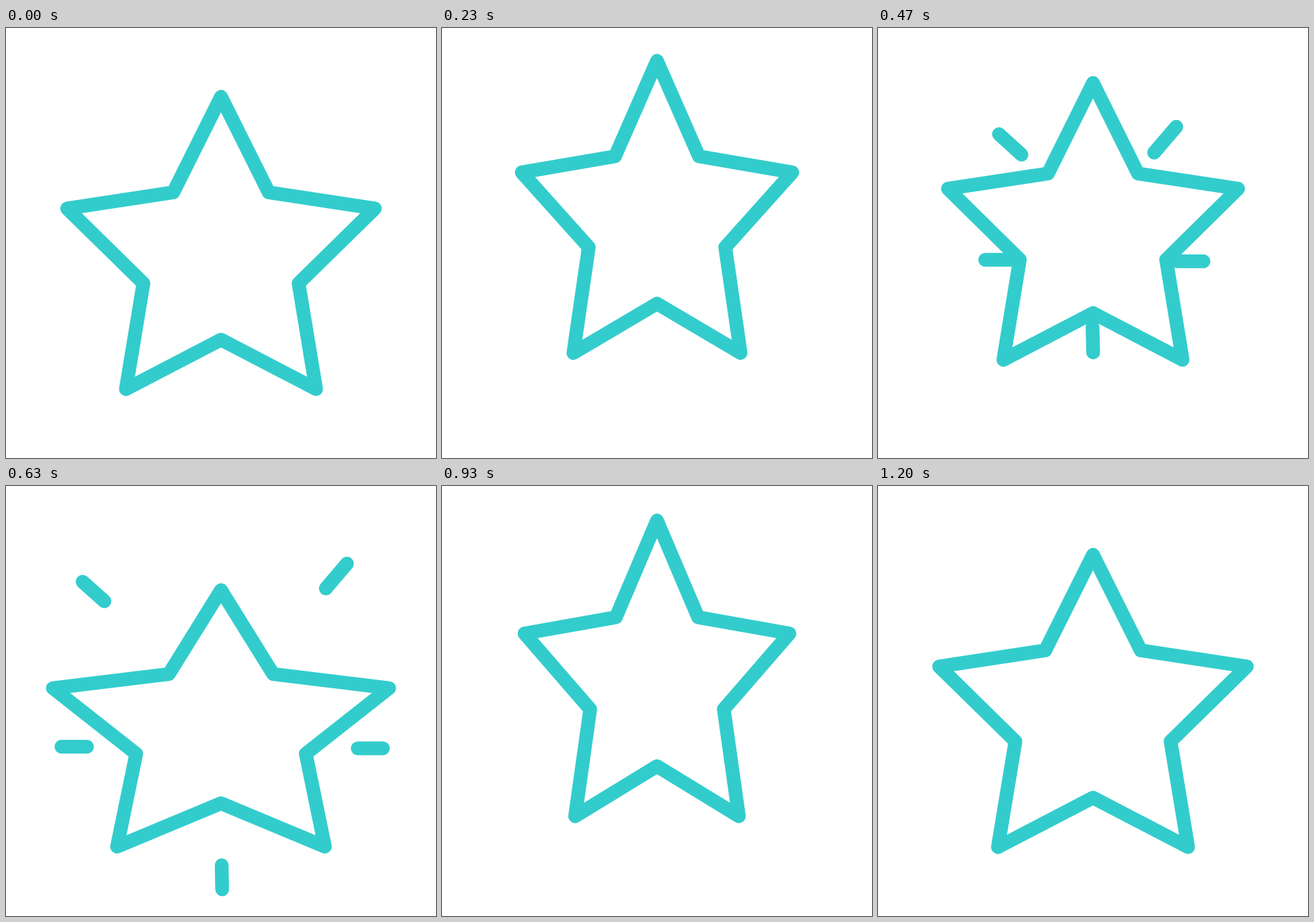
Recreate the animation shown at these times as an HTML page with a canvas. Size 640 by 640 pixels, loop 1.57 s.

```html
<!DOCTYPE html>
<html lang="en">
<head>
<meta charset="utf-8">
<title>Bouncing star</title>
<style>
  html, body { margin: 0; width: 100%; height: 100%; overflow: hidden; background: #fff; }
  canvas { display: block; }
</style>
</head>
<body>
<canvas id="stage" width="640" height="640"></canvas>
<script>
const ctx = document.getElementById('stage').getContext('2d');
const LOOP = 1570, STEP = 100 / 3, LAST_STEP = 36;
const COLOR = '#33cccc';

// Right half of the star: x as offset from the axis, y from 0 (top) to 1 (bottom).
const HALF = [[0, 0], [71, 0.327], [229, 0.382], [115.5, 0.638], [141.5, 1], [0, 0.831]];
const OUTLINE = HALF.concat(HALF.slice(1, -1).reverse().map(([x, y]) => [-x, y]));

// soft: 0 is a linear leg, 1 a full sine ease.
const POSES = [
  { at: 0,  width: 1,     top: 102.4, bottom: 537.5, soft: 0 },
  { at: 10, width: 0.830, top: 26.8,  bottom: 461.7, soft: 0.1 },
  { at: 19, width: 1.093, top: 155,   bottom: 536.7, soft: 0.5 },
  { at: 28, width: 0.861, top: 51.4,  bottom: 491.5, soft: 0.25 },
  { at: 36, width: 1,     top: 102.4, bottom: 537.5, soft: 0.1 }
];

// Each ray as [head x, head y, tail x, tail y] at launch and at rest.
const RAYS = [
  { from: [396.3, 170.7, 362.1, 210.3], to: [507.5, 115.5, 476, 152.5] },
  { from: [229.6, 169.7, 263.9, 201.3], to: [114, 142.5, 146.5, 171.5] },
  { from: [427, 314.8, 387.7, 314.8],   to: [561, 390.5, 523.5, 390.5] },
  { from: [217.4, 312.7, 256.3, 312.7], to: [82.5, 388, 120.5, 388] },
  { from: [319.1, 394.8, 318, 355.1],   to: [321.7, 600.3, 321, 564.5] }
];
const LAUNCH = 10, REST = 19, GONE = 23;

const mix = (a, b, p) => a + (b - a) * p;
const clamp = p => Math.min(1, Math.max(0, p));
const ease = (p, soft) => mix(p, (1 - Math.cos(Math.PI * p)) / 2, soft);

function poseAt(step) {
  const i = Math.max(1, POSES.findIndex(pose => pose.at >= step));
  const a = POSES[i - 1], b = POSES[i];
  const p = ease((step - a.at) / (b.at - a.at), b.soft);
  return {
    width: mix(a.width, b.width, p),
    top: mix(a.top, b.top, p),
    bottom: mix(a.bottom, b.bottom, p)
  };
}

function drawRays(step) {
  if (step <= LAUNCH || step >= GONE) return;
  const p = ease(clamp((step - LAUNCH) / (REST - LAUNCH)), 0.5);
  const shrink = clamp((step - REST) / (GONE - REST));
  for (const { from, to } of RAYS) {
    const [hx, hy, tx, ty] = from.map((v, i) => mix(v, to[i], p));
    ctx.beginPath();
    ctx.moveTo(hx, hy);
    ctx.lineTo(mix(tx, hx, shrink), mix(ty, hy, shrink));
    ctx.stroke();
  }
}

function drawStar(step) {
  const { width, top, bottom } = poseAt(step);
  ctx.beginPath();
  for (const [x, y] of OUTLINE) ctx.lineTo(320 + x * width, mix(top, bottom, y));
  ctx.closePath();
  ctx.fill();
  ctx.stroke();
}

function draw(time) {
  const ms = Math.floor((time % LOOP) / 10) * 10;
  const step = Math.min(LAST_STEP, Math.floor((ms + 5) / STEP));
  ctx.fillStyle = '#fff';
  ctx.fillRect(0, 0, 640, 640);
  ctx.strokeStyle = COLOR;
  ctx.lineWidth = 20.5;
  ctx.lineCap = ctx.lineJoin = 'round';
  drawRays(step);
  drawStar(step);
}

const start = performance.now();
function tick() {
  draw(performance.now() - start);
  requestAnimationFrame(tick);
}
tick();
</script>
</body>
</html>
```
